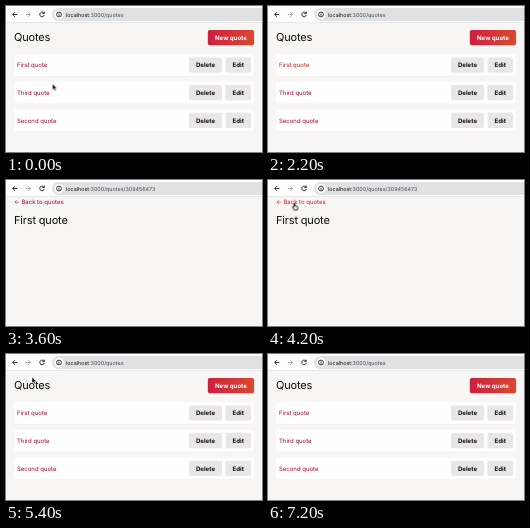
Write an HTML page that moves like this. It is 256 px wide and 146 px high and loops after 7900 ms.

```html
<!DOCTYPE html>
<html lang="en">
<head>
<meta charset="utf-8">
<title>Quotes</title>
<style>
  html, body { margin: 0; width: 100%; height: 100%; overflow: hidden; background: #f7f6f4; }
  svg { display: block; width: 100vw; height: 100vh; }
  text { font: 6px Inter, sans-serif; fill: #0c0c0c; text-rendering: geometricPrecision; white-space: pre; }
  .title { font-size: 11px; letter-spacing: -.17px; }
  .link { fill: #98002e; }
  .btn { font-size: 6.1px; font-weight: 700; text-anchor: middle; }
  .url { font-size: 5.4px; fill: #45484c; }
  .icon { fill: none; stroke: #1f2124; stroke-width: .9; }
  .pointer { stroke-linejoin: round; }
</style>
</head>
<body>
<svg viewBox="0 0 256 146" preserveAspectRatio="none">
  <defs>
    <linearGradient id="warm">
      <stop stop-color="#cd2040"/>
      <stop offset="1" stop-color="#da482f"/>
    </linearGradient>
  </defs>
  <rect width="256" height="146" fill="#f7f6f4"/>

  <g id="bar">
    <rect width="256" height="17" fill="#fdfdfd"/>
    <rect y="16" width="256" height="1" fill="#e9e8e8"/>
    <rect x="46" y="2" width="222" height="13" rx="6.5" fill="#dfe1e3"/>
    <path class="icon" d="M11.4 8.5H6.8M9 6.2 6.7 8.5 9 10.8"/>
    <path class="icon" d="M19.8 8.5h4.6M22.2 6.2l2.3 2.3-2.3 2.3" style="stroke:#a4a6a8"/>
    <path class="icon" d="M38 7.2a2.3 2.3 0 1 0 .3 1.8M38.3 5.6v2h-2"/>
    <circle cx="53" cy="8.5" r="4.6" fill="#fdfdfd"/>
    <circle class="icon" cx="53" cy="8.5" r="2.4"/>
    <path class="icon" d="M53 8.2v1.7M53 6.9v.6"/>
    <text class="url" x="60" y="10.5"><tspan fill="#0c0c0c">localhost</tspan>:3000/quotes<tspan id="path">/309456473</tspan></text>
  </g>

  <g id="list">
    <text class="title" x="8" y="35">Quotes</text>
  </g>

  <g id="show">
    <text class="link" id="back" x="8" y="24.4">← Back to quotes</text>
    <text class="title" x="8" y="44.2">First quote</text>
  </g>

  <g id="cursor">
    <path id="arrow" class="pointer" d="M0 0v6.1l1.4-1.2 1 2.2 1.1-.5-1-2.1h1.9z" fill="#000" stroke="#fff" stroke-width=".5"/>
    <path id="hand" class="pointer" d="M-.6 4.2V.5q.6-.9 1.2 0v2.2l2.1.5q.7.3.6 1.1l-.5 2.5H-.2L-2 4.3q.2-.9 1.4-.1z" fill="#fff" stroke="#000" stroke-width=".9"/>
  </g>
</svg>
<script>
const LOOP = 7900, TICK = 100;
const LINK = '#98002e', HOVER = '#bd1e12';
const $ = id => document.getElementById(id);

function add(parent, tag, attrs, label) {
  const el = document.createElementNS('http://www.w3.org/2000/svg', tag);
  for (const k in attrs) el.setAttribute(k, attrs[k]);
  if (label) el.textContent = label;
  parent.append(el);
  return el;
}

function button(x, y, width, label, fill = '#e8e6e7', ink = '#0c0c0c') {
  add($('list'), 'rect', { x, y, width, height: 15.2, rx: 2, fill });
  add($('list'), 'text', { class: 'btn', x: x + width / 2, y: y + 9.8, style: `fill:${ink}` }, label);
}

button(201.8, 24, 46.3, 'New quote', 'url(#warm)', '#fff');
const links = ['First quote', 'Third quote', 'Second quote'].map((name, i) => {
  const y = 48 + i * 27.7;
  add($('list'), 'rect', { x: 8, y: y + .5, width: 240, height: 22, rx: 2, fill: '#efedeb' });
  add($('list'), 'rect', { x: 8, y, width: 240, height: 22, rx: 2, fill: '#fefefe' });
  button(183, y + 3.4, 33, 'Delete');
  button(219.5, y + 3.4, 25.5, 'Edit');
  return add($('list'), 'text', { class: 'link', x: 11, y: y + 13.3 }, name);
});

function play(el, frames) {
  el.animate(frames, { duration: LOOP, iterations: Infinity });
}

// Hard switches: each row is [time, value].
function hold(el, prop, rows) {
  const frames = rows.map(([t, v]) => ({ offset: t / LOOP, [prop]: v, easing: 'step-end' }));
  frames.push({ offset: 1, [prop]: rows[rows.length - 1][1] });
  play(el, frames);
}

// Stepped travel: each row is [time, x, y].
function travel(el, rows) {
  play(el, rows.map(([t, x, y], i) => {
    const next = rows[i + 1] || [t + TICK];
    return {
      offset: t / LOOP,
      transform: `translate(${x}px, ${y}px)`,
      easing: `steps(${Math.max(1, Math.round((next[0] - t) / TICK))})`
    };
  }));
}

const OFF = 'hidden', ON = 'visible';
const LEAVE = 2400, RETURN = 5200;

hold($('list'), 'visibility', [[0, ON], [LEAVE, OFF], [RETURN, ON]]);
for (const id of ['show', 'path'])
  hold($(id), 'visibility', [[0, OFF], [LEAVE, ON], [RETURN, OFF]]);

hold(links[0], 'fill', [[0, LINK], [1600, HOVER], [LEAVE, LINK]]);
hold($('back'), 'fill', [[0, LINK], [4000, HOVER], [RETURN, LINK]]);

hold($('arrow'), 'visibility', [
  [0, ON], [1600, OFF], [3200, ON], [3500, OFF], [3800, ON], [4000, OFF], [5400, ON], [7200, OFF]
]);
hold($('hand'), 'visibility', [[0, OFF], [1600, ON], [2000, OFF], [4000, ON], [5400, OFF]]);

travel($('cursor'), [
  [0, 46.5, 77.8], [800, 46.5, 77.8], [1400, 31.2, 63.5], [1600, 30.5, 59],
  [3100, 32, 62], [3900, 26.5, 26], [4200, 26.5, 23.2], [4500, 26.5, 23.2],
  [4800, 26, 23], [6600, 26, 23], [6900, 199, 3], [7000, 199, 3],
  [7100, 201, 1.5], [LOOP, 201, 1.5]
]);
</script>
</body>
</html>
```
